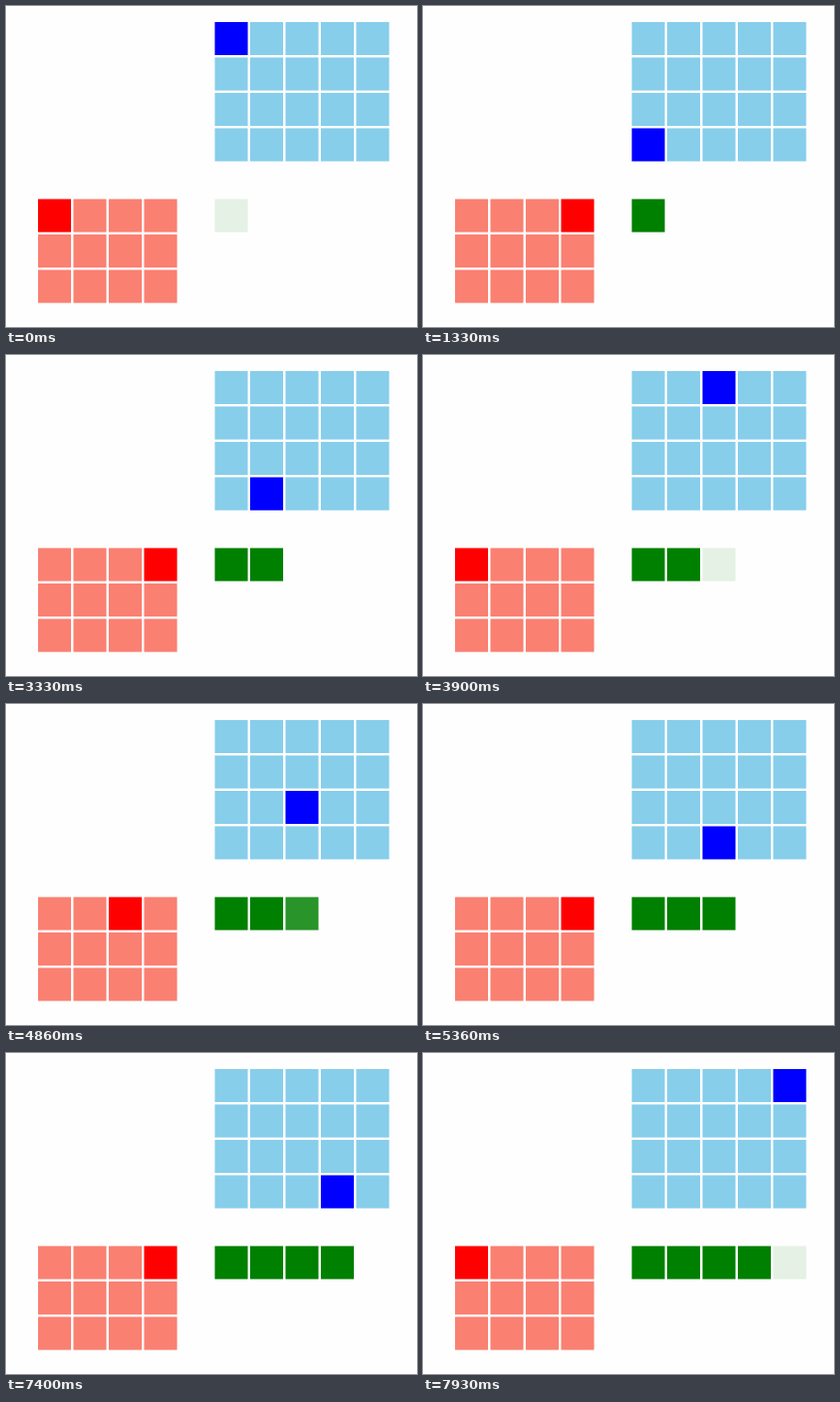
These frames come from a looping animation (436 by 340 pixels, 8 s). An HTML page:

```html
<!DOCTYPE html>
<html lang="en">
<head>
<meta charset="utf-8">
<title>Matrix product</title>
<style>
  html, body { margin: 0; width: 100%; height: 100%; overflow: hidden; background: #fefefe; }
  svg { display: block; width: 436px; height: 340px; }
</style>
</head>
<body>
<svg id="stage" viewBox="0 0 436 340"></svg>
<script>
const LOOP = 8000;
const PITCH = 37.5, SIZE = 35, LEFT = 34, TOP = 17;
const INNER = 4, COLS = 5, ROWS = 3;
const STEP_TIMES = [0, 400, 800, 1330, 1830, 2330, 2830, 3330, 3900,
  4330, 4860, 5360, 5860, 6360, 6860, 7400, 7930];

const stage = document.getElementById('stage');

function cell(col, row, fill) {
  const r = document.createElementNS('http://www.w3.org/2000/svg', 'rect');
  const attrs = { x: LEFT + col * PITCH, y: TOP + row * PITCH, width: SIZE, height: SIZE, fill };
  for (const name in attrs) r.setAttribute(name, attrs[name]);
  return stage.appendChild(r);
}

function grid(col, row, cols, rows, fill) {
  return Array.from({ length: rows }, (_, y) =>
    Array.from({ length: cols }, (_, x) => cell(col + x, row + y, fill)));
}

const right = grid(5, 0, COLS, INNER, 'skyblue');
const left = grid(0, 5, INNER, ROWS, 'salmon');
const result = grid(5, 5, COLS, 1, 'green')[0];

// Each term paints over the last one with growing opacity: 0.1, 0.4, 0.7, 1.
function coverage(term) {
  let rest = 1;
  for (let i = 0; i <= term; i++) rest *= 0.9 - 0.3 * i;
  return 1 - Math.max(0, rest);
}

function render(time) {
  const step = STEP_TIMES.filter(t => t <= time).length - 1;
  const term = step % INNER, col = Math.floor(step / INNER);
  right.forEach((row, y) => row.forEach((r, x) =>
    r.setAttribute('fill', x === col && y === term ? 'blue' : 'skyblue')));
  left[0].forEach((r, x) => r.setAttribute('fill', x === term ? 'red' : 'salmon'));
  result.forEach((r, x) =>
    r.setAttribute('opacity', x < col ? 1 : x === col ? coverage(term) : 0));
}

const start = performance.now();
function tick() {
  render((performance.now() - start) % LOOP);
  requestAnimationFrame(tick);
}
tick();
</script>
</body>
</html>
```
